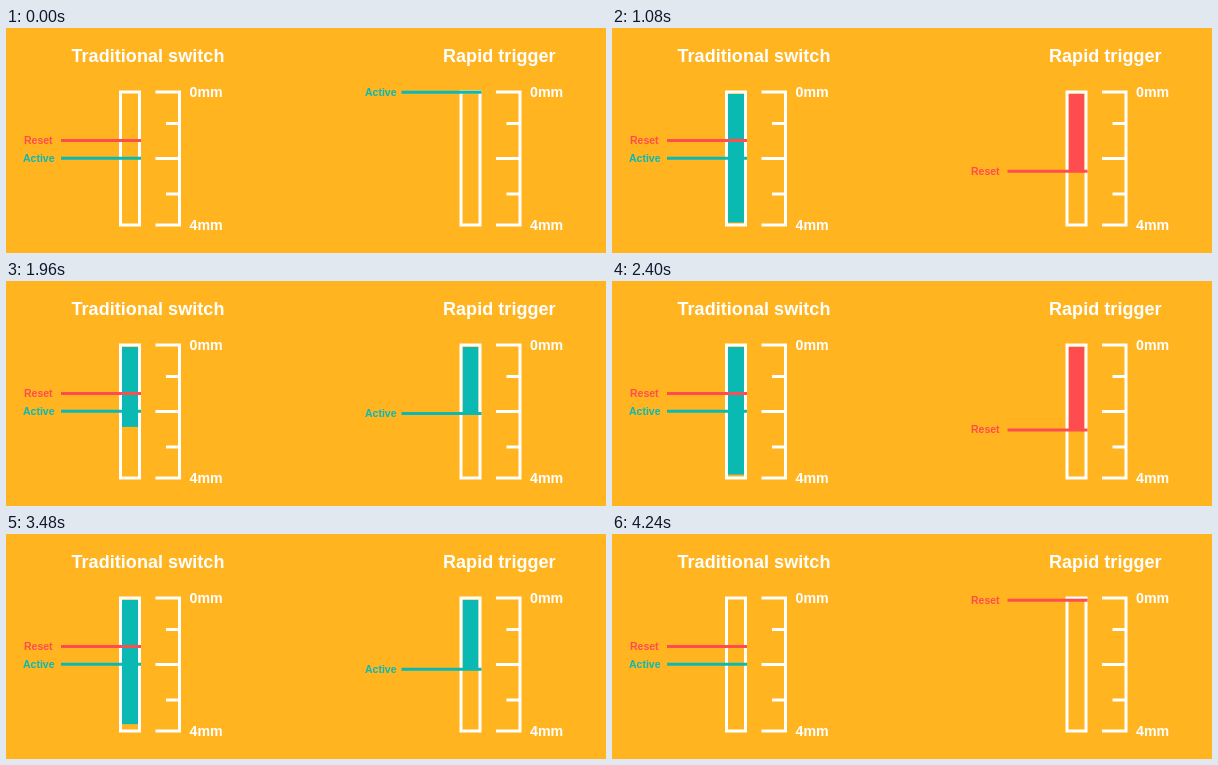
Write an HTML page that moves like this. It is 600 px wide and 225 px high and loops after 4280 ms.

```html
<!DOCTYPE html>
<html lang="en">
<head>
<meta charset="utf-8">
<title>Switch travel</title>
<style>
html, body { margin: 0; width: 100%; height: 100%; overflow: hidden; background: #ffb420; }
svg { display: block; width: 600px; height: 225px; }
text { font: bold 10.5px "Liberation Sans", Arial, sans-serif; }
.title { font-size: 18px; letter-spacing: .05px; fill: #fff; }
.unit { font-size: 14.2px; fill: #fff; }
.frame { fill: none; stroke: #fff; stroke-width: 3; }
line { stroke-width: 3; }
</style>
</head>
<body>
<svg viewBox="0 0 600 225">
  <defs>
    <g id="gauge">
      <rect class="frame" x="114.5" y="64" width="19" height="133"/>
      <path class="frame" d="M149.5 64H173.5V197H149.5M149.5 130.5H173.5M160 95.5H173.5M160 166H173.5"/>
      <text class="unit" x="183.5" y="68.5">0mm</text>
      <text class="unit" x="183.5" y="201.5">4mm</text>
    </g>
  </defs>
  <text class="title" x="65.5" y="34">Traditional switch</text>
  <text class="title" x="437" y="34">Rapid trigger</text>

  <rect id="leftFill" x="116" y="66" width="16" height="0"/>
  <use href="#gauge"/>
  <g fill="#ff4d4f" stroke="#ff4d4f">
    <text x="18" y="116" stroke="none">Reset</text>
    <line x1="55" x2="135" y1="112.5" y2="112.5"/>
  </g>
  <g fill="#0ab9b2" stroke="#0ab9b2">
    <text x="17" y="133.5" stroke="none">Active</text>
    <line x1="55" x2="135" y1="130.3" y2="130.3"/>
  </g>

  <rect id="rightFill" x="456.5" y="66" width="16" height="0"/>
  <use href="#gauge" x="340.5"/>
  <g id="marker">
    <text id="label" x="359" y="3.5" stroke="none"></text>
    <line x1="395.5" x2="475.5" y1="0" y2="0"/>
  </g>
</svg>
<script>
const LOOP = 4280, STEP = 40, RED = '#ff4d4f', TEAL = '#0ab9b2';
const $ = id => document.getElementById(id);

// Cubic Bezier with control points (.42, 0) and (.2, 1)
function sharpEase(x) {
  let lo = 0, hi = 1, s = .5;
  for (let i = 0; i < 24; i++) {
    s = (lo + hi) / 2;
    const r = 1 - s;
    if (1.26 * r * r * s + .6 * r * s * s + s ** 3 < x) lo = s; else hi = s;
  }
  return s * s * (3 - 2 * s);
}
const smooth = u => u * u * (3 - 2 * u);
const easeOut = u => 1 - (1 - u) ** 2;

// Keys are [time, depth, easing towards this key]
const leftKeys = [[440, 64], [1080, 194.5], [1720, 88], [2360, 194.5],
  [3000, 88], [3640, 194.5], [4280, 64]].map(([t, y]) => [t, y, sharpEase]);
const rightKeys = [[440, 64], [870, 195, smooth],
  [1200, 135, easeOut], [1528, 185, smooth],
  [1900, 128, easeOut], [2260, 185, smooth],
  [2660, 122, easeOut], [3040, 185, smooth],
  [3480, 135, easeOut], [3840, 191, smooth], [4272, 64, smooth]];

function sample(keys, t) {
  const i = keys.findIndex(k => k[0] > t);
  if (i === 0) return { y: keys[0][1], down: true };
  if (i < 0) return { y: keys[keys.length - 1][1], down: false };
  const [t0, y0] = keys[i - 1], [t1, y1, ease] = keys[i];
  return { y: y0 + (y1 - y0) * ease((t - t0) / (t1 - t0)), down: y1 > y0 };
}

function fill(id, y, color) {
  $(id).setAttribute('height', Math.max(0, y - 66));
  $(id).setAttribute('fill', color);
}

function draw(now) {
  const t = Math.floor(now % LOOP / STEP) * STEP;
  const left = sample(leftKeys, t), right = sample(rightKeys, t);

  // The fixed switch activates at one depth and resets at a higher one
  fill('leftFill', left.y, left.y > (left.down ? 130 : 112) ? TEAL : RED);

  const color = right.down ? TEAL : RED;
  fill('rightFill', right.y, color);
  $('label').textContent = right.down ? 'Active' : 'Reset';
  $('marker').setAttribute('fill', color);
  $('marker').setAttribute('stroke', color);
  $('marker').setAttribute('transform', `translate(0 ${right.y + .3})`);
}

const start = performance.now();
function tick() {
  draw(performance.now() - start);
  requestAnimationFrame(tick);
}
tick();
</script>
</body>
</html>
```
